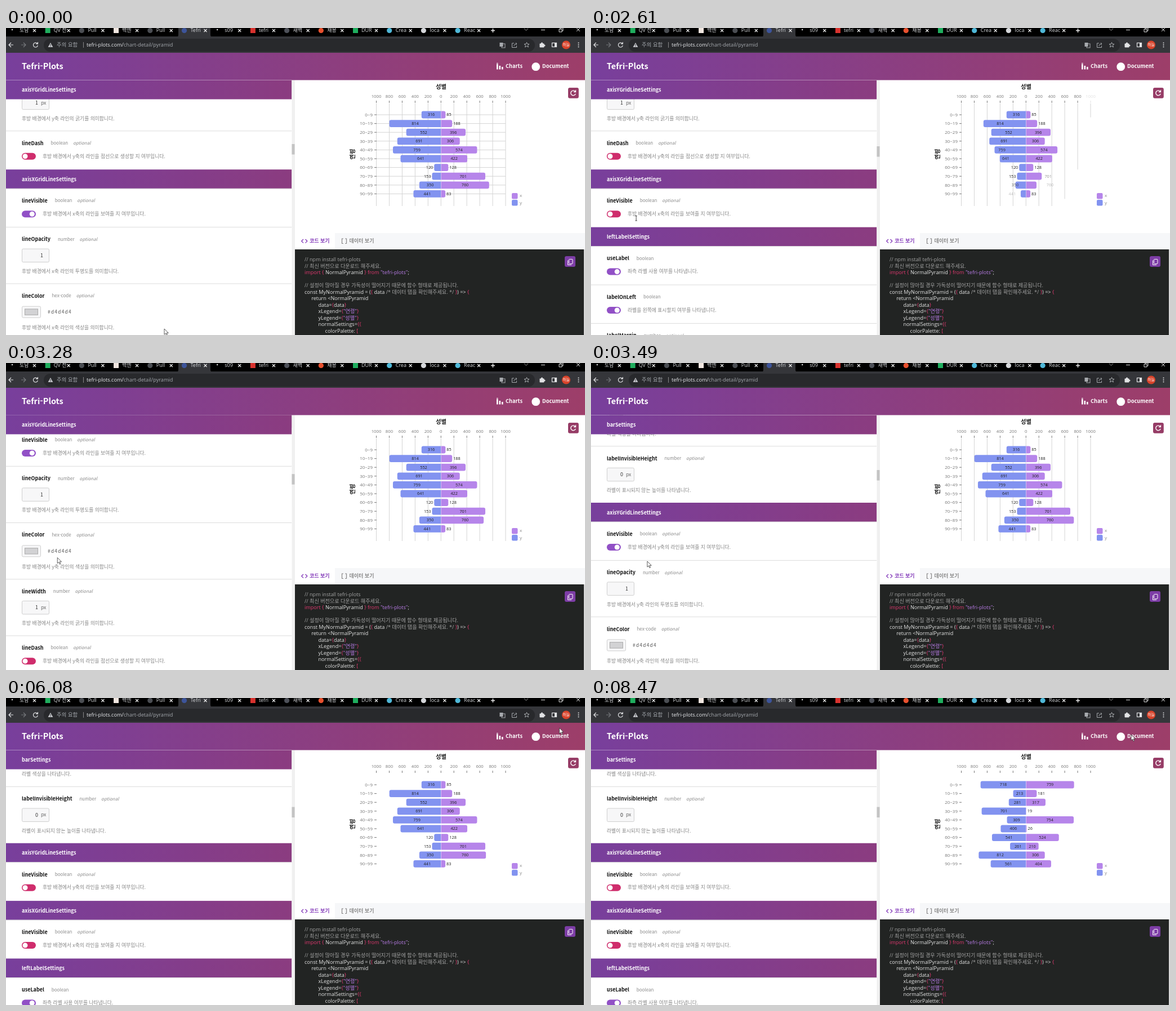
An HTML page that plays this animation: 1028x545 px, repeating every 8.53 s.

```html
<!DOCTYPE html>
<html lang="ko">
<head>
<meta charset="utf-8">
<title>Chart settings</title>
<style>
html,body{margin:0;width:100%;height:100%;overflow:hidden;background:#fff}
svg{display:block}
text{font-family:"Noto Sans CJK KR","Noto Sans CJK",sans-serif;white-space:pre}
.o,.o tspan{font-family:"Open Sans","Noto Sans CJK KR","Noto Sans CJK",sans-serif}
.b{font-weight:700}
</style>
</head>
<body>
<svg id="stage" width="1028" height="545" viewBox="0 0 1028 545"></svg>
<script>
const LOOP = 8530, ROW_MS = 95;
const CLICK_X = 1640, CLICK_Y = 4340, CLICK_NEW = 6650;
const TOP = 92.5, HEAD = 34, TOGGLE = 68.4, INPUT = 100.3;
const ON = '#9150c6', OFF = '#cf2d6c', NOTE = '#858585';

const text = (x, y, s, size, fill, o = {}) =>
  `<text x="${x}" y="${y + size * 0.36}" font-size="${size}" fill="${fill}" class="${o.c || ''}"` +
  ` text-anchor="${o.a || 'start'}" ${o.x || ''}>${s}</text>`;
const rect = (x, y, w, h, fill, more = '') =>
  `<rect x="${x}" y="${y}" width="${w}" height="${h}" fill="${fill}" ${more}/>`;
const dot = (x, y, r, fill) => `<circle cx="${x}" cy="${y}" r="${r}" fill="${fill}"/>`;
const path = (d, color, w = 1.2) => `<path d="${d}" fill="none" stroke="${color}" stroke-width="${w}"/>`;

// linear interpolation over [time, value...] keys
function at(keys, t) {
  if (t <= keys[0][0]) return keys[0].slice(1);
  for (let i = 1; i < keys.length; i++) {
    const [a, b] = [keys[i - 1], keys[i]];
    if (t < b[0]) return a.slice(1).map((v, j) => v + (b[j + 1] - v) * (t - a[0]) / (b[0] - a[0]));
  }
  return keys[keys.length - 1].slice(1);
}
const clamp = v => Math.max(0, Math.min(1, v));

/* ---------- browser frame ---------- */
function browser() {
  const tabs = [
    ['dot', '#ddd', '도담'], ['sq', '#1fae5e', 'QV 전'], ['dot', '#4a4d52', 'Pull'], ['sq', '#f0e6e0', '백엔'],
    ['dot', '#4a4d52', 'Pull'], ['dot', '#3d549a', 'Tefri'], ['dot', '#ddd', 's09'], ['sq', '#d8322e', 'tefri'],
    ['dot', '#4d5058', '새벽'], ['dot', '#e8502e', '채용'], ['sq', '#1fae5e', 'DUR'], ['dot', '#4fb8d8', 'Crea'],
    ['dot', '#d5d7da', 'loca'], ['dot', '#4fb8d8', 'Reac']];
  let s = rect(0, 0, 1028, 16, '#000') + rect(0, 15, 1028, 29, '#35363a') +
    '<path d="M302 16q4 0 4-4V0h57v12q0 4 4 4z" fill="#35363a"/>';
  tabs.forEach(([kind, color, label], i) => {
    const x = 13 + i * 60.7;
    if (kind == 'sq') s += rect(x - 4, 0, 9, 9, color);
    else if (color == '#ddd') s += dot(x - 2, 3, 1.2, color);
    else s += dot(x, 4.5, 4.6, color);
    s += text(x + 11, 4, label, 9, '#d5d7da', {c: 'o'});
    s += path(`M${x + 35} 2l5 5m0-5l-5 5`, '#eee');
  });
  s += path('M861 4.5h7m-3.5-3.5v7', '#eee', 1.4) + path('M920 1l3.5 3.5L927 1', '#555') +
    path('M950 3.5h7M982 2h5v5h-5zM984 2V0h5v5h-2M1013 0l6 6m0-6l-6 6', '#ddd', 1);
  s += rect(67, 19, 872, 23, '#28292c', 'rx="11.5"');
  s += path('M13 30H5.5m3.5-4l-4 4l4 4', '#e2e3e5') + path('M27 30h7.5m-3.5-4l4 4l-4 4', '#77797d') +
    path('M55.6 27.6a4 4 0 1 0 .8 3.4M56.4 25v3.2h-3.2', '#e2e3e5');
  s += '<path d="M79 26l4.4 8h-8.8z" fill="#c3c5c9"/>' + rect(78.5, 28.6, 1, 2.6, '#202124') + rect(78.5, 32, 1, 1, '#202124');
  s += text(90, 30, '주의 요함', 9.4, '#a9adb2') + rect(137, 25, 1, 10, '#888') +
    text(143, 30, 'tefri-plots.com/<tspan fill="#a4a8ad">chart-detail/pyramid</tspan>', 9.2, '#e8eaed', {c: 'o'});
  s += rect(876.5, 26, 6, 7, '#a7aaae') + rect(880, 28, 6, 7, 'none', 'stroke="#a7aaae"') +
    path('M902 27h-3.5v7.5h8v-3M902 32q0-4 5-4m-2-2l2 2l-2 2', '#a7aaae', 1) +
    path('M924.5 25.5l1.3 3h3.2l-2.5 2.2l.9 3.3l-2.9-1.9l-2.9 1.9l.9-3.3l-2.5-2.2h3.2z', '#b5b8bc', .9) +
    rect(947.5, 27.5, 8, 7, '#e2e3e5', 'rx="1"') + dot(951.5, 27, 1.6, '#e2e3e5') + dot(956, 31, 1.5, '#e2e3e5') +
    rect(969.5, 26.5, 8, 7, 'none', 'stroke="#e2e3e5" stroke-width="1.2"') + rect(974, 26, 4, 8, '#e2e3e5') +
    dot(994.5, 30, 7.6, '#d8432a') + text(994.5, 30, '하늘', 6.5, '#fff', {a: 'middle'});
  for (const y of [26.5, 30, 33.5]) s += dot(1016.5, y, 1, '#e2e3e5');
  return s;
}

function pageHead() {
  return rect(0, 44, 1028, TOP - 44, 'url(#wide)') +
    text(28, 68, 'Tefri-Plots', 14.5, '#fff', {c: 'b'}) +
    rect(871, 64, 2.6, 9.5, '#fff') + rect(875.5, 67, 2.6, 6.5, '#fff') + rect(880, 69, 2.6, 4.5, '#fff') +
    rect(871, 62, 2.6, 1.2, '#fff') +
    text(887, 68, 'Charts', 9.3, '#fff', {c: 'b'}) +
    dot(940.7, 68.7, 7.4, '#fff') + text(952, 68, 'Document', 9.3, '#fff', {c: 'b'});
}

/* ---------- settings panel ---------- */
const header = (y, name) =>
  rect(0, y, 507.5, HEAD, 'url(#left)') + text(28, y + 17.5, name, 9, '#fff', {c: 'b'});

function item(y, [name, type, kind, desc, value]) {
  const opt = /^(use|labelOn)/.test(name) ? '' : '<tspan dx="9" font-style="italic">optional</tspan>';
  let s = rect(0, y - .5, 507.5, 1, '#dcdcdc') + text(28, y + 22, `<tspan class="b" font-size="9" fill="#111">${name}</tspan>` +
    `<tspan dx="13" dy="-.6">${type}</tspan>${opt}`, 8, '#8a8a8a');
  if (kind == 'toggle') {
    const c = y + 45;
    return s + rect(28, c - 6, 25, 12, value ? ON : OFF, 'rx="6"') + dot(value ? 46.3 : 34, c, 4.5, '#fff') +
      text(65, c - .4, desc, 8.78, NOTE);
  }
  const box = (w, h) => rect(28.5, y + 50.3 - h / 2, w, h, '#f7f7f8', 'rx="2" stroke="#cfcfcf"');
  if (kind == 'color') s += box(33, 20) + rect(33.5, y + 45, 23, 10.5, '#d2d2d4', 'stroke="#aaa"') +
    text(74, y + 50.3, value, 8.3, '#555', {x: 'letter-spacing="1.3"'});
  else if (kind == 'px') s += box(48, 23.5) + text(57, y + 50, value, 9, '#333', {a: 'end'}) + text(62, y + 50, 'px', 8.5, '#666');
  else s += box(48, 23.5) + text(66, y + 50, value, 9, '#333', {a: 'end'});
  return s + text(28, y + 78, desc, 8.78, NOTE);
}

function gridItems(axis, on) {
  const pre = `후방 배경에서 ${axis}축`;
  const list = [['lineVisible', 'boolean', 'toggle', `${pre}의 라인을 보여줄 지 여부입니다.`, on]];
  if (on) list.push(
    ['lineOpacity', 'number', 'num', `${pre} 라인의 투명도를 의미합니다.`, '1'],
    ['lineColor', 'hex-code', 'color', `${pre} 라인의 색상을 의미합니다.`, '#d4d4d4'],
    ['lineWidth', 'number', 'px', `${pre} 라인의 굵기를 의미합니다.`, '1'],
    ['lineDash', 'boolean', 'toggle', `${pre}의 라인을 점선으로 생성할 지 여부입니다.`, false]);
  return list;
}

// y = 0 is the top of the axisY header
function panel(yOn, xOn) {
  let y = -2 * INPUT;
  const put = list => list.map(it => {
    const s = item(y, it);
    y += it[2] == 'toggle' ? TOGGLE : INPUT;
    return s;
  }).join('');
  const head = name => { y += HEAD; return header(y - HEAD, name); };
  return put([['labelColor', 'hex-code', 'color', '라벨 색상을 나타냅니다.', '#000000'],
      ['labelInvisibleHeight', 'number', 'px', '라벨이 표시되지 않는 높이를 나타냅니다.', '0']]) +
    head('axisYGridLineSettings') + put(gridItems('y', yOn)) +
    head('axisXGridLineSettings') + put(gridItems('x', xOn)) +
    head('leftLabelSettings') + put([
      ['useLabel', 'boolean', 'toggle', '좌측 라벨 사용 여부를 나타냅니다.', true],
      ['labelOnLeft', 'boolean', 'toggle', '라벨을 왼쪽에 표시할지 여부를 나타냅니다.', true],
      ['labelMargin', 'number', 'px', '라벨의 여백을 나타냅니다.', '0']]);
}

/* ---------- right side ---------- */
function code() {
  const p = s => `<tspan fill="#e0386f">${s}</tspan>`, v = s => `<tspan fill="#b87be6">${s}</tspan>`;
  const g = s => `<tspan fill="#a3a3a3">${s}</tspan>`;
  const lines = [
    [0, g('// npm install tefri-plots')], [0, g('// 최신 버전으로 다운로드 해주세요.')],
    [0, `${p('import {')} NormalPyramid ${p('}')} ${p('from')} ${v('"tefri-plots"')};`], [0, ''],
    [0, g('// 설정이 많아질 경우 가독성이 떨어지기 때문에 함수 형태로 제공됩니다.')],
    [0, `const MyNormalPyramid = (${p('{')} data ${g('/* 데이터 탭을 확인해주세요. */')} ${p('}')}) =&gt; ${p('{')}`],
    [1, 'return &lt;NormalPyramid'], [2, `data=${p('{')}data${p('}')}`],
    [2, `xLegend=${p('{')}${v('"연령"')}${p('}')}`], [2, `yLegend=${p('{')}${v('"성별"')}${p('}')}`],
    [2, `normalSettings=${p('{{')}`], [3, `colorPalette: ${p('[')}`]];
  return lines.map(([n, s], i) => text(530 + n * 12.2, 411 + i * 11.5, s, 9.1, '#e4e4e4', {c: 'o'})).join('');
}

function rightSide() {
  return rect(513, TOP, 515, 272, '#fff') +
    text(772.5, 104, '성별', 10.3, '#222', {a: 'middle', c: 'b'}) +
    `<g transform="translate(615 224) rotate(-90)">${text(0, 0, '연령', 10.3, '#222', {a: 'middle', c: 'b'})}</g>` +
    rect(898, 293, 10.5, 10.5, '#b685ea', 'rx="2"') + rect(898, 305, 10.5, 10.5, '#8293f0', 'rx="2"') +
    text(912, 297.6, 'x', 8, '#888', {c: 'o'}) + text(912, 309.8, 'y', 8, '#888', {c: 'o'}) +
    rect(998, 106, 18.8, 18.8, '#963c66', 'rx="3"') +
    path('M1010.6 112.9a4.3 4.3 0 1 0 .6 3.8M1011.4 110.2v3.4h-3.4', '#fff', 1.4) +
    rect(513, 364, 515, 29, '#f6f7f9') + rect(513, 364, 71, 29, '#fff') +
    path('M528 375l-3.3 3.3l3.3 3.3M531.5 375l3.3 3.3l-3.3 3.3', '#8136b8', 1.3) +
    text(539, 378, '코드 보기', 9, '#8136b8', {c: 'b'}) +
    path('M599 374h-2.5v8.5h2.5M602 374h2.5v8.5h-2.5', '#888') +
    text(609.5, 378, '데이터 보기', 9, '#888', {c: 'b'}) +
    rect(513, 393, 513, 152, '#222423') + rect(1026, 393, 2, 152, '#d9d9d9') + code() +
    rect(992, 405, 19, 19, '#7d3da6', 'rx="3"') +
    rect(999.5, 410.5, 6.5, 8, 'none', 'stroke="#fff" rx="1"') + path('M997.5 412.5v8h6.5', '#fff', 1);
}

/* ---------- chart ---------- */
const DATA_1 = [[316, 85], [814, 188], [552, 396], [691, 306], [759, 574], [641, 422], [120, 128], [153, 701], [350, 760], [441, 83]];
const DATA_2 = [[718, 759], [213, 181], [281, 317], [701, 19], [309, 754], [406, 26], [541, 524], [261, 210], [812, 306], [561, 404]];
const MID = 772.3, REACH = [[0, 0], [7, 65], [9.3, 77], [12.5, 90], [15, 96]];

function bar(value, dir, y, u) {
  const full = .1147 * value - 1.7, w = Math.min(full, at(REACH, u)[0]);
  if (w <= 0) return '';
  const r = Math.min(3, w), h = 12.8;
  const d = `M${MID} ${y - h / 2}h${dir * (w - r)}q${dir * r} 0 ${dir * r} ${r}v${h - 2 * r}q0 ${r} ${-dir * r} ${r}h${-dir * (w - r)}z`;
  const inside = full > 21;
  const x = inside ? MID + dir * full / 2 : MID + dir * (full + 2);
  return `<path d="${d}" fill="${dir < 0 ? '#8293f0' : '#b685ea'}"/>` +
    text(x, y - .3, value, 7.3, '#222', {c: 'o', a: inside ? 'middle' : dir < 0 ? 'end' : 'start',
      x: `opacity="${clamp(w / full * 1.4)}"`});
}

function chart(t) {
  const start = t < CLICK_X ? -5000 : t < CLICK_Y ? CLICK_X + 20 : t < CLICK_NEW ? CLICK_Y + 32 : CLICK_NEW + 15;
  const data = t < CLICK_NEW ? DATA_1 : DATA_2;
  const u = (t - start) / ROW_MS;
  let s = '';
  for (let k = 0; k < 11; k++) {
    const x = 657.5 + k * 22.95, v = u - k + .2, len = 182 * (1 - (1 - clamp(v / 3)) ** 2);
    if (v <= 0) continue;
    if (t < CLICK_Y) s += rect(x - .5, 134, 1, len, '#d4d4d4');
    s += `<g opacity="${clamp(v)}">${text(x, 121.5, Math.abs(1000 - k * 200), 7.7, '#777', {c: 'o', a: 'middle'})}` +
      rect(x - .5, 129, 1, 4, '#777') + '</g>';
  }
  const rowY = i => 154 + i * 15.6;
  if (t < CLICK_X) for (let i = 0; i < 10; i++) s += rect(658, rowY(i) - .5, 229, 1, '#d4d4d4');
  data.forEach(([l, r], i) => {
    const y = rowY(i), v = u - i;
    s += `<g opacity="${clamp(v + .12)}">${text(651, y, `${i * 10}~${i * 10 + 9}`, 8, '#777', {c: 'o', a: 'end'})}` +
      rect(654, y - .5, 4, 1, '#777') + '</g>';
    s += bar(l, -1, y, v) + bar(r, 1, y, v);
  });
  if (u > .2) s += rect(MID - .3, 147.6, .6, Math.min(10, Math.ceil(u)) * 15.6 - 2.8, '#fff', 'opacity=".55"');
  return s;
}

/* ---------- assembly ---------- */
const SCROLL = [[2700, -220.5], [2880, -131], [3280, 80], [3470, 248]];
const POINTER = [
  [0, 281, 534], [70, 281, 534], [880, 232, 330], [1400, 38, 328], [1680, 38, 328], [2350, 76, 330], [2700, 76, 332],
  [2880, 74.5, 333], [3490, 100, 352], [4180, 40, 322], [4380, 40, 322], [4690, 614, 305], [5060, 650, 344],
  [5600, 996, 40], [5940, 982.5, 53], [6080, 982.5, 53], [6480, 1005, 112], [7350, 1005, 112], [7670, 971, 90], [8150, 959, 65]];

const stage = document.getElementById('stage');
const gradient = (id, w, a, b) =>
  `<linearGradient id="${id}" gradientUnits="userSpaceOnUse" x1="0" y1="0" x2="${w}" y2="0"><stop stop-color="${a}"/><stop offset="1" stop-color="${b}"/></linearGradient>`;
stage.innerHTML = `<defs>${gradient('wide', 1028, '#783f9c', '#9d3e69')}${gradient('left', 507, '#783f9c', '#8b3c80')}
  <clipPath id="pane"><rect x="0" y="${TOP}" width="507.5" height="453"/></clipPath></defs>` +
  rect(0, 0, 1028, 545, '#fff') +
  `<g clip-path="url(#pane)"><g id="list">${[[1, 1], [1, 0], [0, 0]].map(a => `<g>${panel(...a)}</g>`).join('')}</g>
  <g id="sticky">${['axisYGridLineSettings', 'barSettings'].map(n => `<g>${header(0, n)}</g>`).join('')}</g></g>` +
  rect(507.5, TOP, 5.5, 453, '#f0f0f0') + rect(507.5, 0, 5, 18.5, '#c4c4c4', 'id="thumb"') +
  rightSide() + '<g id="chart"></g>' + browser() + pageHead() +
  `<g id="arrow"><path d="M0 0v10.2l2.4-2.2l1.7 3.8l1.6-.8l-1.7-3.6h3.3z" fill="#fff" stroke="#333" stroke-width=".8"/></g>
  <g id="beam">${path('M78.5 333.5h3.2M80.2 333.5v8.5M78.5 342h3.4', '#333', .9)}</g>`;

const $ = id => document.getElementById(id);
const list = $('list'), sticky = $('sticky'), layers = [...list.children];
const show = (el, on) => el.setAttribute('visibility', on ? 'visible' : 'hidden');
const move = (el, x, y) => el.setAttribute('transform', `translate(${x} ${y})`);

function draw(t) {
  const phase = t < CLICK_X ? 0 : t < CLICK_Y ? 1 : 2;
  const top = phase == 2 ? 257.7 : at(SCROLL, t)[0];
  layers.forEach((g, i) => show(g, i == phase));
  move(list, 0, top);
  const past = top > TOP;
  move(sticky, 0, past ? Math.min(TOP, top - HEAD) : TOP);
  show(sticky.children[0], !past);
  show(sticky.children[1], past);
  $('thumb').setAttribute('y', phase == 0 ? 206 : phase == 2 ? 193.5 : 200.6 - top * .0427);
  $('chart').innerHTML = chart(t);
  const beam = t > 2430 && t < 2700;
  show($('beam'), beam);
  show($('arrow'), !beam);
  move($('arrow'), ...at(POINTER, t));
}

const begin = performance.now();
function tick() {
  draw((performance.now() - begin) % LOOP);
  requestAnimationFrame(tick);
}
tick();
</script>
</body>
</html>
```
